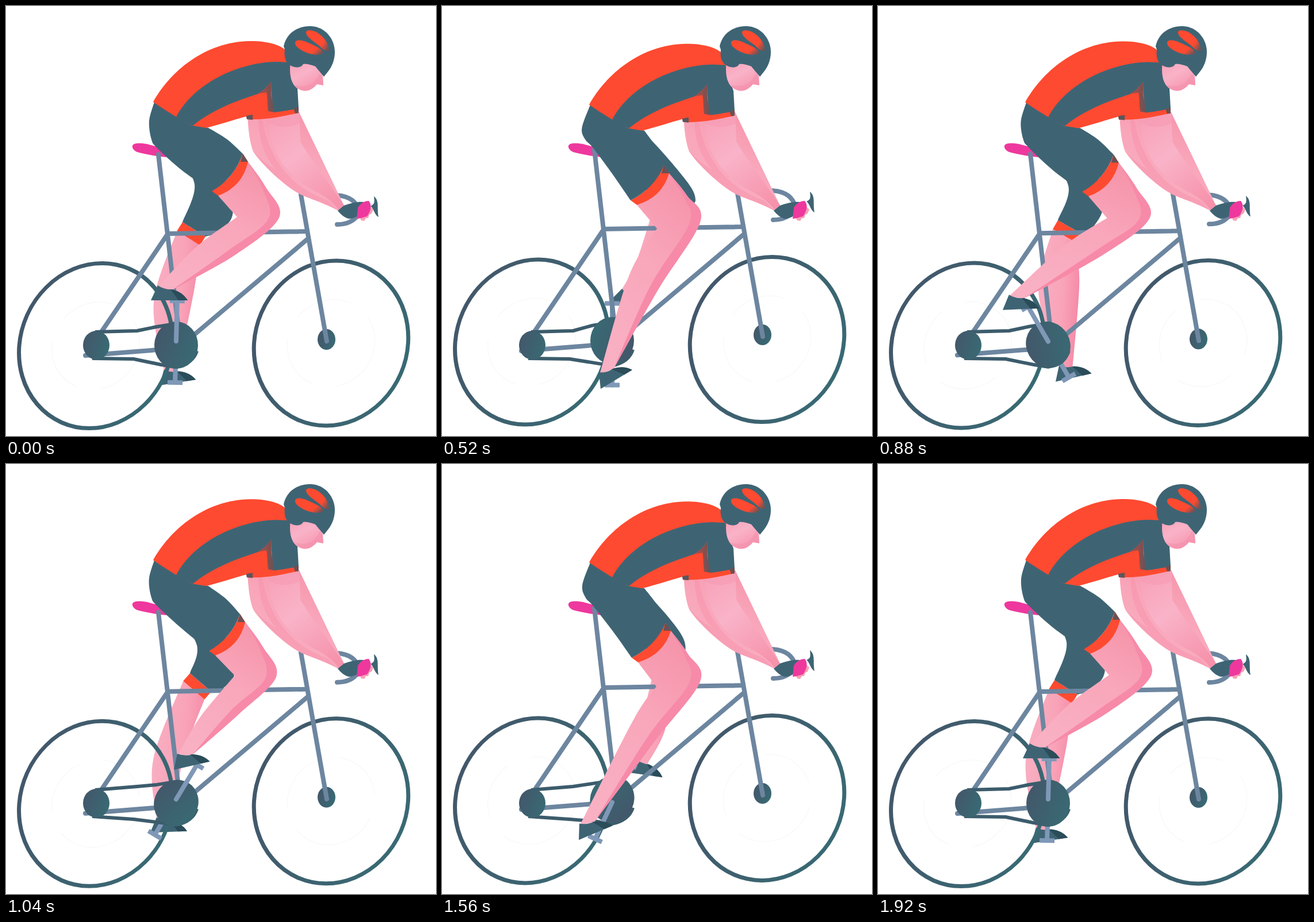
An HTML page for the animation above (1.96 s loop, 748 px wide and 748 px high).

```html
<!DOCTYPE html>
<html lang="en">
<head>
<meta charset="utf-8">
<title>Cyclist</title>
<style>
  html, body { margin: 0; width: 100%; height: 100%; overflow: hidden; background: #fff; }
  svg { display: block; width: 100%; height: 100%; }
  .dark { fill: #3e6474; }
  .red { fill: #fe4a30; }
  .line { fill: none; stroke: #6d86a0; stroke-width: 8; stroke-linecap: round; stroke-linejoin: round; }
  .crank { fill: none; stroke: #7f98b7; stroke-width: 8; stroke-linecap: round; }
  .bar { fill: none; stroke: #7f98b7; stroke-width: 8; }
  .chain { fill: none; stroke: #3c5c6c; stroke-width: 6; stroke-linejoin: round; }
  .rim { fill: none; stroke: url(#steel); stroke-width: 7; }
  .spokes { fill: none; stroke: #f6f6f6; stroke-width: 1; stroke-dasharray: 100 42; }
</style>
</head>
<body>
<svg viewBox="0 0 748 748">
  <defs>
    <linearGradient id="steel" x1="0" y1=".3" x2="1" y2=".7">
      <stop offset="0" stop-color="#43576a"/><stop offset="1" stop-color="#386a74"/>
    </linearGradient>
    <linearGradient id="skin" x1=".8" y1="0" x2=".3" y2="1">
      <stop offset="0" stop-color="#f592a9"/><stop offset=".45" stop-color="#f9a6ba"/><stop offset="1" stop-color="#f9b0c3"/>
    </linearGradient>
    <linearGradient id="farSkin" x1="0" y1=".4" x2="1" y2=".6">
      <stop offset="0" stop-color="#f9afc2"/><stop offset=".6" stop-color="#f9a3b8"/><stop offset="1" stop-color="#f588a6"/>
    </linearGradient>
    <linearGradient id="armSkin" x1=".2" y1="0" x2=".8" y2="1">
      <stop offset="0" stop-color="#f8a3ba"/><stop offset=".4" stop-color="#f9b3c8"/><stop offset="1" stop-color="#f692ab"/>
    </linearGradient>
    <linearGradient id="vent" x1="0" y1=".2" x2="1" y2=".8">
      <stop offset=".72" stop-color="#fe4a30"/><stop offset="1" stop-color="#6d5457"/>
    </linearGradient>
    <linearGradient id="fold" x1="0" y1="0" x2="1" y2="0">
      <stop offset="0" stop-color="#b84c42"/><stop offset="1" stop-color="#665258"/>
    </linearGradient>
    <g id="shoe">
      <path class="dark" d="M0 0L12-26Q24-18 38-19Q56-14 64 0Z"/>
      <path fill="#2b4c59" d="M34-19.500Q55-15 64 0H48Z"/>
    </g>
  </defs>

  <path id="farCalf" fill="url(#farSkin)"/>
  <path id="farCuff" class="red"/>
  <path id="farThigh" class="dark"/>
  <use id="farShoe" href="#shoe"/>

  <g id="wheels">
    <g transform="matrix(1 0 -.078 1 156 591)">
      <ellipse class="rim" rx="133" ry="143.500"/><circle class="spokes" r="76"/>
    </g>
    <g transform="matrix(1 0 -.062 1 565.500 586.500)">
      <ellipse class="rim" rx="134" ry="143.500"/><circle class="spokes" r="76"/>
    </g>
  </g>

  <path fill="#ee389e" d="M220 243C222 238 232 238 245 240L275 248L280 263C262 262 240 257 228 254C222 251 219 247 220 243Z"/>
  <g id="farCrank"><path class="crank" d="M0 0V-70"/><path class="bar" d="M-13-72H13"/></g>
  <g id="frame">
    <ellipse fill="url(#steel)" cx="557.500" cy="580" rx="15.500" ry="18"/>
    <path class="line" d="M265 258L302 580M281 396L520 392M525 405L300 595M281 397L157 580M138 608L290 596M513 328L558 583M558 329C594 327 607 338 613 352M576 380C592 380 604 375 612 364"/>
    <path class="dark" d="M640 331C650 339 645 350 648 367C641 364 640 352 634 348C642 345 641 340 640 331Z"/>
  </g>
  <path id="chain" class="chain"/>
  <ellipse fill="url(#steel)" cx="157" cy="590" rx="23" ry="25"/>
  <ellipse id="ring" fill="url(#steel)" rx="38" ry="41"/>
  <g id="crank"><path class="crank" d="M0 0V-70"/><path class="bar" d="M-13-70H13"/></g>

  <path id="leg" fill="url(#skin)"/>
  <path id="shade" fill="#f78aa8"/>
  <path id="cuff" class="red"/>
  <path id="cuffDark" fill="#6b5054"/>
  <path id="shorts" class="dark"/>
  <use id="nearShoe" href="#shoe"/>

  <path fill="url(#skin)" d="M420 185C421 215 424 238 430 253C445 277 490 318 515 329C530 336 550 341 578 356L588 347L510 185Z"/>
  <path fill="#f68fa9" opacity=".45" d="M428 250C446 277 490 318 515 329C530 336 550 341 578 356L560 338C500 318 455 270 445 190L440 190C438 225 446 258 470 285C450 273 438 262 428 250Z"/>
  <path fill="url(#armSkin)" d="M457 185C455 240 475 285 530 318C555 330 567 340 579 355L588 347C570 318 530 268 512 236L510 185Z"/>
  <path fill="#f79db5" opacity=".7" d="M457 185V204C475 213 495 212 511 204V185Z"/>

  <g id="shirt">
    <path class="red" d="M256 167C285 115 345 62 425 61C455 61 475 67 487 77L495 100L505 140L509 186C480 192 450 199 419 197L418 192C395 198 370 207 348 212L324 208C310 200 297 195 256 167Z"/>
    <path class="dark" d="M296 193C330 130 410 98 470 97L493 98C497 120 505 135 507 143L509 178C495 181 475 184 467 185C462 170 462 150 462 131C455 140 448 147 438 153C400 165 360 180 325 208C312 203 303 197 296 193Z"/>
    <path fill="url(#fold)" d="M438 153C450 146 457 138 462 131L461 155L467 185L456 183C454 165 455 158 453 150Z"/>
    <path fill="#6b5054" d="M500 178L509 176V186L503 187Z"/>
    <path fill="#5a565d" d="M418 191L429 189V198L419 197Z"/>
  </g>

  <path fill="#f9a0b5" d="M614 366L632 347L639 354L636 361L632 363L630 369L626 369L623 374L618 373Z"/>
  <path class="dark" d="M577 356L588 347C600 343 612 340 622 341L625 352C618 362 608 370 596 370C588 368 582 362 577 356Z"/>
  <path fill="#ee389e" d="M612 351C616 343 624 339 631 339C637 346 635 356 628 366C622 367 616 370 610 370Z"/>

  <path fill="url(#armSkin)" d="M495 98C491 125 499 146 519 147.500C528 148 535 143 541 136L552 138L551 122L546 108L520 95Z"/>
  <path fill="#f692ad" opacity=".6" d="M503 137C508 145 514 147.500 519 147.500C528 148 535 143 541 136L552 138L551 122L545 118C538 135 524 143 503 137Z"/>
  <path class="dark" d="M483 70C488 46 508 35 530 35C556 36 572 58 572 80C572 92 568 104 561 113L553 123C549 118 543 111 538 105C530 102 522 100 517 101C514 107 506 108 498 105C488 101 483 92 485 76Z"/>
  <path fill="url(#vent)" d="M522 46C522 41 532 41 541 46C553 53 560 64 562 75C563 82 552 77 548 72C540 64 522 55 522 46Z"/>
  <path fill="url(#vent)" d="M503 64C503 58 514 58 526 64C540 70 552 76 552 82C548 87 530 85 518 79C509 74 503 70 503 64Z"/>
</svg>

<script>
const TURN = 960, LOOP = 1960, STEP = 40;
const $ = id => document.getElementById(id);
const KEYS = [0, 80, 400, 520, 600, 720];

// crank lead in degrees, bike lift, chain sag
const RIG = [
  [1.5, 0, 1], [1, -.3, 0], [-15, -6, 1], [-15, -8, 1], [-20, -7, 0], [-8, -4, 1]
];
// cuff front, cuff back, knee, knee back, calf back, calf front, heel, foot angle
const NEAR = [
  [412,257, 358,322, 475,368, 402,367, 330,420, 400,432, 252,512, 0],
  [407,261, 353,325, 470,370, 398,368, 338,440, 405,435, 292,532, -13],
  [385,277, 330,338, 451,377, 377,387, 329,458, 378,500, 317,641, -35],
  [386,277, 328,338, 449,376, 374,387, 325,470, 375,495, 276,666, -31],
  [389,276, 330,337, 449,378, 373,387, 333,445, 372,480, 238,654, -23],
  [399,266, 341,329, 461,371, 383,378, 322,437, 390,448, 191,621, -14]
];
// thigh front, knee, cuff front, cuff back, thigh back, calf back, calf front, heel, foot angle
const FAR = [
  [394,346, 374,390, 347,401, 307,376, 328,310, 257,515, 328,490, 267,660, -9],
  [396,352, 378,390, 357,396, 320,364, 332,315, 256,515, 312,500, 251,641, -2],
  [412,285, 426,332, 405,350, 362,340, 325,280, 305,447, 335,485, 241,530, 32],
  [422,300, 441,337, 425,352, 370,340, 325,280, 338,445, 360,470, 293,512, 20],
  [412,290, 423,328, 405,350, 370,345, 325,280, 345,460, 388,462, 320,536, 8],
  [385,300, 388,350, 376,367, 342,357, 341,325, 329,440, 388,450, 359,588, -17]
];
// how strongly each point follows its pedal
const NEAR_PULL = [0, 0, 0, 0, .4, .4, 1];
const FAR_PULL = [0, 0, 0, 0, 0, .4, .4, 1];

// periodic monotone cubic interpolation of table rows
function sample(rows, p) {
  const n = KEYS.length;
  const row = i => rows[(i + n) % n];
  const time = i => KEYS[(i + n) % n] + TURN * Math.floor(i / n);
  let i = n - 1;
  while (KEYS[i] > p) i--;
  const h = time(i + 1) - time(i), u = (p - time(i)) / h;
  return row(i).map((a, c) => {
    const rate = k => (row(k + 1)[c] - row(k)[c]) / (time(k + 1) - time(k));
    const slope = k => {
      const r = rate(k - 1), s = rate(k);
      return r * s > 0 ? 2 * r * s / (r + s) : 0;
    };
    const b = row(i + 1)[c], v = 1 - u;
    return a * (1 + 2 * u) * v * v + b * (3 - 2 * u) * u * u
      + h * u * v * (slope(i) * v - slope(i + 1) * u);
  });
}

function rigAt(p) {
  const [lead, lift, sag] = sample(RIG, p);
  const angle = lead + 360 * p / TURN, a = angle * Math.PI / 180;
  const hub = [296, 583 - lift * .8];
  const pedal = side => [hub[0] + side * 70 * Math.sin(a), hub[1] - side * 70 * Math.cos(a)];
  return { angle, lift, sag, hub, pedal };
}

const follow = (row, pull, pedal, sign) => row.map((v, c) =>
  v + sign * (pull[c >> 1] || 0) * pedal[c % 2] * (c < pull.length * 2));
const detach = (rows, pull, side) =>
  rows.map((r, i) => follow(r, pull, rigAt(KEYS[i]).pedal(side), -1));
const nearRows = detach(NEAR, NEAR_PULL, 1), farRows = detach(FAR, FAR_PULL, -1);

function limb(rows, pull, p, pedal) {
  const v = follow(sample(rows, p), pull, pedal, 1);
  return { pts: pull.map((_, i) => [v[2 * i], v[2 * i + 1]]), tilt: v[v.length - 1] };
}

const add = (a, x, y) => [a[0] + x, a[1] + y];
const mid = (a, b, x = 0, y = 0) => [(a[0] + b[0]) / 2 + x, (a[1] + b[1]) / 2 + y];
const str = pts => pts.map(q => q.map(v => v.toFixed(2)).join(' ')).join(' ');

// smooth open curve through points; runs join with corners
function curve(pts) {
  let d = str([pts[0]]);
  for (let i = 0; i < pts.length - 1; i++) {
    const a = pts[i], b = pts[i + 1], o = pts[i - 1] || a, e = pts[i + 2] || b;
    d += 'C' + str([
      add(a, (b[0] - o[0]) / 6, (b[1] - o[1]) / 6),
      add(b, (a[0] - e[0]) / 6, (a[1] - e[1]) / 6), b]);
  }
  return d;
}
const shape = (...runs) => 'M' + runs.map(curve).join('L') + 'Z';
const setPath = (id, d) => $(id).setAttribute('d', d);
const place = (id, at, turn = 0) =>
  $(id).setAttribute('transform', `translate(${at[0]} ${at[1]}) rotate(${turn})`);

function onShoe(heel, tilt, x, y) {
  const a = tilt * Math.PI / 180, c = Math.cos(a), s = Math.sin(a);
  return add(heel, x * c - y * s, x * s + y * c);
}

function drawFar(p, rig) {
  const { pts, tilt } = limb(farRows, FAR_PULL, p, rig.pedal(-1));
  const [front, knee, c1, c2, back, calfBack, calfFront, heel] = pts;
  const dx = c1[0] - c2[0], dy = c1[1] - c2[1], k = 18 / Math.hypot(dx, dy);
  const e1 = add(c1, -dy * k, dx * k), e2 = add(c2, -dy * k, dx * k);
  setPath('farThigh', shape([[300, 200], [345, 215], front, knee, c1], [c2, back, [290, 250]]));
  setPath('farCuff', shape([c2, c1], [e1, e2]));
  setPath('farCalf', shape(
    [e2, calfBack, onShoe(heel, tilt, 12, -23)],
    [onShoe(heel, tilt, 34, -17), calfFront, e1]));
  place('farShoe', heel, tilt);
}

function drawNear(p, rig, drop) {
  const { pts, tilt } = limb(nearRows, NEAR_PULL, p, rig.pedal(1));
  const [c1, c2, knee, bend, calfBack, calfFront, heel] = pts;
  const e1 = add(c1, 9, 14), e2 = add(c2, 11, 8), lift = rig.lift;
  const thigh = mid(e1, knee, 4, -4);
  const ankle = onShoe(heel, tilt, 37, -18);
  const outer = [e1, thigh, knee, calfFront, ankle];
  setPath('leg', shape(outer, [onShoe(heel, tilt, 12, -23), calfBack, bend], [bend, e2]));
  setPath('shade', shape(outer,
    [ankle, add(calfFront, -13, -7), add(knee, -19, 3), add(thigh, -5, 4), e1]));

  const top = 'Q' + str([mid(c1, c2, 12, 10), c1]);
  setPath('cuff', 'M' + str([c2]) + top + 'L' + str([e1]) + 'Q' + str([mid(e1, e2, 16, 14), e2]) + 'Z');
  setPath('cuffDark', 'M' + str([c1, e1, add(c1, -4, 14)]) + 'Z');
  const rear = [[258, 167 + drop], [249 + lift * .7, 200 - lift * 1.5], [253 + lift * .5, 232],
    [263, 247], [305 + lift, 285 - lift], c2];
  const waist = [352, 212 + drop];
  setPath('shorts', 'M' + curve(rear) + top + 'L'
    + curve([c1, mid(c1, waist, 2, -3), waist]) + 'L' + str([[325, 206 + drop], [300, 190 + drop]]) + 'Z');
  place('nearShoe', heel, tilt);
}

function draw(t) {
  const p = t % TURN, rig = rigAt(p), { angle, lift, sag, hub } = rig;
  const drop = -lift * .6;
  drawFar(p, rig);
  drawNear(p, rig, drop);
  place('wheels', [0, lift * .8]);
  place('frame', [0, lift]);
  place('shirt', [0, drop]);
  place('ring', [296, 590 + lift], angle);
  place('crank', hub, angle);
  place('farCrank', hub, angle + 180);
  const y = lift * .3;
  setPath('chain', `M155 567L228 ${561 + 4 * sag}L${262} ${558 + y}L300 ${552 + y}`
    + `M150 613L222 ${618 - 4 * sag}L270 ${624 + y}L296 ${628 + y}Q325 ${622 + y} 332 ${600 + y}`);
  document.querySelectorAll('.spokes').forEach(s =>
    s.setAttribute('transform', `rotate(${angle * 2})`));
}

const start = performance.now();
function tick() {
  const t = (performance.now() - start) % LOOP;
  draw(Math.floor(t / STEP) * STEP);
  requestAnimationFrame(tick);
}
tick();
</script>
</body>
</html>
```
